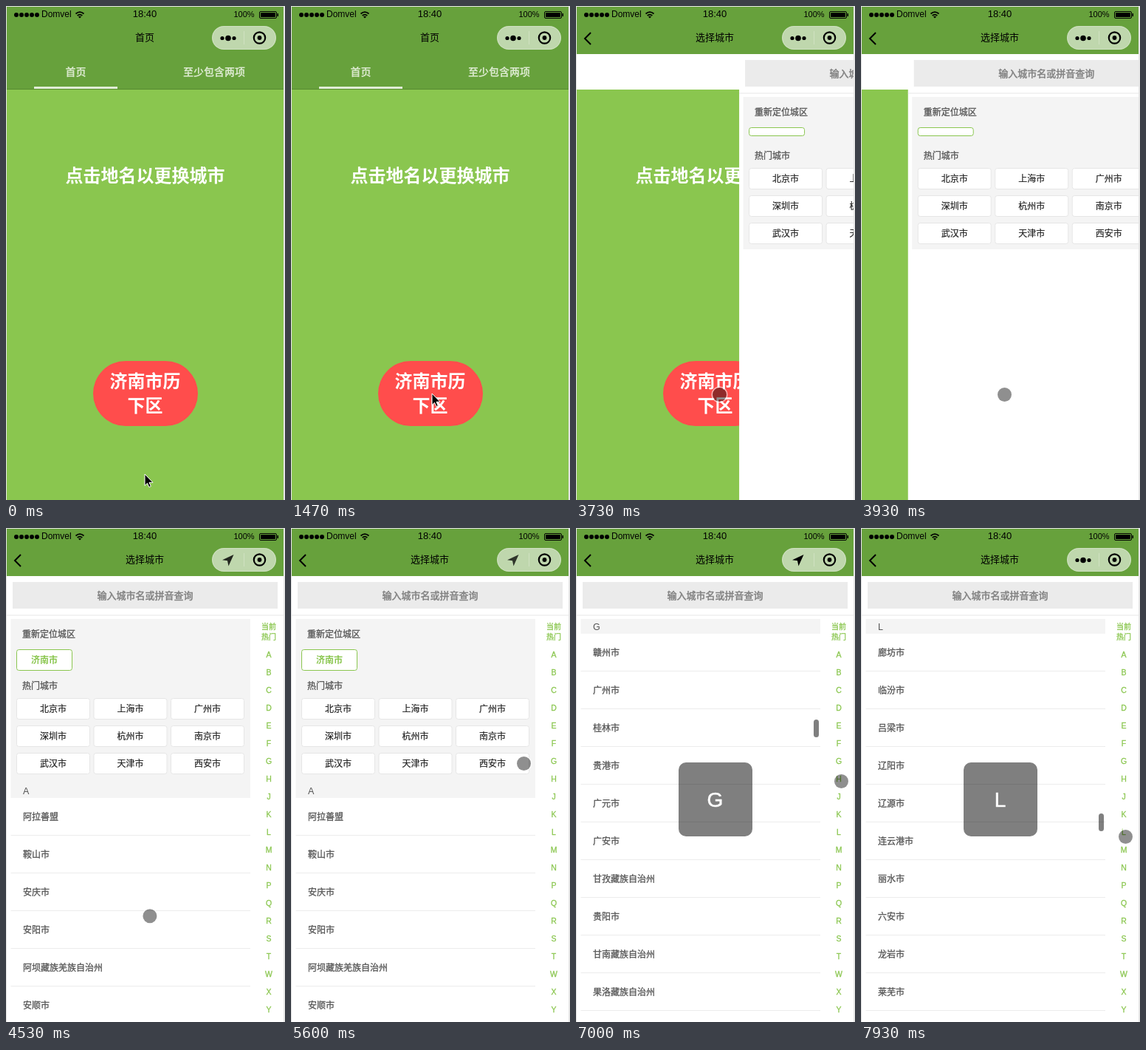
Animation, 378 px wide and 668 px high, one loop 8000 ms. Source, as an HTML page:

```html
<!DOCTYPE html>
<html lang="zh">
<head>
<meta charset="utf-8">
<title>选择城市</title>
<style>
html, body { margin: 0; width: 100%; height: 100%; overflow: hidden; background: #e6e6e6; }
svg { display: block; }
text { font-family: "Liberation Sans", "Noto Sans CJK SC", "Noto Sans CJK", sans-serif; }
</style>
</head>
<body>
<svg id="stage" width="378" height="668"></svg>
<script>
const LOOP = 8000, GREEN = '#8ac64f', BAR = '#67a13c', INK = '#555';

function el(parent, tag, attrs = {}) {
  const node = document.createElementNS('http://www.w3.org/2000/svg', tag);
  for (const key in attrs) node.setAttribute(key, attrs[key]);
  return parent.appendChild(node);
}
const group = (parent, attrs) => el(parent, 'g', attrs);
const rect = (parent, x, y, width, height, fill, attrs) =>
  el(parent, 'rect', { x, y, width, height, fill, ...attrs });
const dot = (parent, cx, cy, r, attrs) => el(parent, 'circle', { cx, cy, r, ...attrs });
const path = (parent, d, attrs) => el(parent, 'path', { d, ...attrs });
// Text is placed by its vertical middle; a thin stroke gives the medium weight.
function label(parent, words, x, middle, size, fill, attrs) {
  const node = el(parent, 'text', { x, y: middle + size * .37, 'font-size': size, fill, ...attrs });
  node.textContent = words;
  return node;
}
const medium = (color, width = .3) => ({ stroke: color, 'stroke-width': width });
const centred = (parent, words, x, middle, size, fill, attrs) =>
  label(parent, words, x, middle, size, fill, { 'text-anchor': 'middle', ...attrs });
const BOLD = { 'font-weight': 700 };
const show = (node, on) => node.setAttribute('visibility', on ? 'inherit' : 'hidden');
const move = (node, x, y) => node.setAttribute('transform', `translate(${x} ${y})`);

const stage = document.getElementById('stage');
const screen = el(stage, 'svg', { width: 376, height: 668 });
rect(screen, 1, 1, 375, 667, '#fff');

// Home page
const home = group(screen);
rect(home, 1, 113, 375, 555, GREEN);
centred(home, '点击地名以更换城市', 188.5, 229.5, 24, '#fff', BOLD);
rect(home, 118, 480, 142, 88, '#ff4d4c', { rx: 44 });
centred(home, '济南市历', 188.5, 507.5, 24, '#fff', BOLD);
centred(home, '下区', 188.5, 540.5, 24, '#fff', BOLD);

const tabs = group(screen);
rect(tabs, 1, 65, 375, 48, BAR);
rect(tabs, 1, 112, 375, 1, '#568a31');
centred(tabs, '首页', 94.5, 88.5, 14, '#d9e8cc', BOLD);
centred(tabs, '至少包含两项', 282, 88.5, 14, '#d9e8cc', BOLD);
rect(tabs, 38, 109, 113, 3, '#e1edd7');

// City page
const page = group(screen);
rect(page, 1, 65, 375, 603, '#fff');
rect(page, 9, 73, 359, 36, '#ebebeb');
centred(page, '输入城市名或拼音查询', 188.5, 91, 13, '#808080', medium('#808080', .5));
rect(page, 1, 117.5, 375, 1, '#e8e8e8');

const view = el(page, 'svg', { y: 123, width: 376, height: 545 });
const content = group(view);
const panel = rect(content, 6.5, 0, 324.5, 206, '#f4f4f4');
label(content, '重新定位城区', 22, 20.5, 12, INK, medium(INK));
const spot = rect(content, 14.5, 41.5, 75, 11, '#fff', { rx: 3, stroke: GREEN });
const spotName = centred(content, '济南市', 52, 55.5, 12, GREEN, BOLD);
const hot = group(content);
label(hot, '热门城市', 22, 90.5, 12, INK, medium(INK));
'北京市 上海市 广州市 深圳市 杭州市 南京市 武汉市 天津市 西安市'.split(' ').forEach((city, i) => {
  const x = 14.5 + i % 3 * 104.5, y = 107.5 + Math.floor(i / 3) * 37;
  rect(hot, x, y, 99, 28, '#fff', { rx: 3, stroke: '#e6e6e6' });
  centred(hot, city, x + 49.5, y + 14, 12, '#222', medium('#222', .2));
});

// Each section: letter, scroll thumb position, cities
const sections = [
  'A 130 阿拉善盟 鞍山市 安庆市 安阳市 阿坝藏族羌族自治州 安顺市 阿里地区 安康市 阿克苏地区 阿勒泰地区 澳门',
  'B 149 北京市 保定市 包头市 巴彦淖尔市 本溪市 白山市 白城市 蚌埠市 亳州市 滨州市 北海市',
  'C 175 承德市 沧州市 长治市 赤峰市 朝阳市 长春市 常州市 滁州市 巢湖市 池州市 长沙市',
  'D 210 大同市 大连市 丹东市 大庆市 大兴安岭地区 东营市 德州市 东莞市 德阳市 达州市 大理白族自治州',
  'E 236 鄂尔多斯市 鄂州市 恩施土家族苗族自治州',
  'F 241 抚顺市 阜新市 阜阳市 福州市 抚州市 佛山市 防城港市',
  'G 259 赣州市 广州市 桂林市 贵港市 广元市 广安市 甘孜藏族自治州 贵阳市 甘南藏族自治州 果洛藏族自治州 固原市',
  'H 281 邯郸市 衡水市 呼和浩特市 呼伦贝尔市 葫芦岛市 哈尔滨市 鹤岗市 黑河市 淮安市 杭州市 湖州市',
  'J 332 晋城市 晋中市 锦州市 吉林市 鸡西市 佳木斯市 嘉兴市 金华市 景德镇市 九江市 吉安市',
  'K 373 开封市 昆明市 克拉玛依市 克孜勒苏柯尔克孜自治州 喀什地区',
  'L 386 廊坊市 临汾市 吕梁市 辽阳市 辽源市 连云港市 丽水市 六安市 龙岩市 莱芜市 临沂市',
].map(line => {
  const [letter, thumb, ...cities] = line.split(' ');
  return { letter, thumb: +thumb, cities };
});
const list = group(content);
let rowTop = 222;
for (const section of sections) {
  section.top = rowTop;
  rect(list, 6.5, rowTop, 324.5, 20, '#f4f4f4');
  label(list, section.letter, 23, rowTop + 10.5, 12.5, INK);
  rowTop += 20;
  for (const city of section.cities) {
    label(list, city, 23, rowTop + 25.5, 12, INK, medium(INK));
    rect(list, 6.5, rowTop + 50, 324.5, 1, '#ececec');
    rowTop += 51;
  }
}

centred(page, '当前', 356, 133, 10, GREEN, medium(GREEN));
centred(page, '热门', 356, 147, 10, GREEN, medium(GREEN));
[...'ABCDEFGHJKLMNPQRSTWXY'].forEach((letter, i) =>
  centred(page, letter, 356, 171 + i * 24, 10.5, GREEN, medium(GREEN)));

const overlay = group(page);
const thumb = rect(overlay, 322, 0, 7, 24, '#000', { rx: 3.5, opacity: .5 });
rect(overlay, 139, 317, 100, 100, '#000', { rx: 10, opacity: .5 });
const toast = centred(overlay, '', 188.5, 367, 28, '#fff', medium('#fff', .5));

// Status and title bar
const bar = group(screen);
rect(bar, 1, 1, 375, 64, BAR);
for (let i = 0; i < 5; i++) dot(bar, 14 + i * 7, 12, 3);
label(bar, 'Domvel', 48, 10.5, 12, '#000');
path(bar, 'M94.5 10.5Q100 5.8 105.5 10.5M96.7 13Q100 10.2 103.3 13',
  { fill: 'none', stroke: '#000', 'stroke-width': 1.7 });
path(bar, 'M98 14.4Q100 12.9 102 14.4L100 16.6Z');
centred(bar, '18:40', 188, 10.4, 13, '#000');
label(bar, '100%', 308.5, 11, 11, '#000');
rect(bar, 343.5, 7.5, 23, 9, 'none', { rx: 1.5, stroke: '#000' });
rect(bar, 345, 9, 20, 6, '#000');
rect(bar, 367.5, 10, 1.5, 4, '#000');

const title = centred(bar, '', 188, 42, 13, '#000');
const back = path(bar, 'M20 36L12 44L20 52', { fill: 'none', stroke: '#000', 'stroke-width': 2 });
rect(bar, 279, 27, 87, 32, '#fff', { rx: 16, opacity: .58 });
rect(bar, 279.5, 27.5, 86, 31, 'none', { rx: 15.5, stroke: '#fff', opacity: .25 });
rect(bar, 322, 34, 1, 18, '#fff', { opacity: .25 });
const more = group(bar);
dot(more, 293, 43.5, 2.6);
dot(more, 301, 43.5, 3.8);
dot(more, 309, 43.5, 2.6);
const locating = path(bar, 'M308.5 36L293 43.3L300 44.3L301.5 51.5Z');
dot(bar, 343.5, 43, 7.7, { fill: 'none', stroke: '#000', 'stroke-width': 2.2 });
dot(bar, 343.5, 43, 2.9);

// Pointer: an arrow that turns into a touch spot
const pointer = group(stage);
const arrow = path(pointer, 'M-4 -7V8.5L-.5 5.3L1.8 10.6L4.3 9.5L2 4.3H7Z',
  { fill: '#000', stroke: '#fff', 'stroke-width': 1 });
const touch = group(pointer);
dot(touch, 0, 0, 10.2, { fill: 'none', stroke: '#fff', 'stroke-width': 1.6, opacity: .6 });
dot(touch, 0, 0, 9.5, { opacity: .44 });

// time, x, y
const track = [
  [0, 192, 640], [150, 192, 640], [900, 195, 533], [1470, 195, 531], [1800, 195, 531],
  [2150, 196, 582], [2600, 195, 537], [2930, 195, 535], [3400, 194.5, 525.5], [4500, 194.5, 525.5],
  [5400, 315.5, 318.5], [5640, 315.5, 318.5], [5960, 357, 171], [6080, 358, 171],
  [7000, 359.5, 342.5], [7750, 358.5, 396], [7840, 358.5, 417.5], [LOOP, 358.5, 417.5],
];
const clamp = v => Math.max(0, Math.min(1, v));
const ramp = (t, from, to) => clamp((t - from) / (to - from));

function pointerAt(t) {
  const i = Math.max(1, track.findIndex(key => key[0] > t));
  const [t0, x0, y0] = track[i - 1], [t1, x1, y1] = track[i];
  const p = ramp(t, t0, t1), e = t0 < 6000 ? p * p * (3 - 2 * p) : p;
  return [x0 + (x1 - x0) * e, y0 + (y1 - y0) * e];
}

const NAVIGATE = 3470, SLIDE = 3600, LOCATED = 4500, PRESS = 5980, LAG = 90;

function draw(t) {
  const inCity = t >= NAVIGATE, located = t >= LOCATED, pressed = t >= PRESS;
  title.textContent = inCity ? '选择城市' : '首页';
  show(back, inCity);
  show(tabs, !inCity);
  show(page, t >= SLIDE);
  move(page, 375 * (1 - ramp(t, SLIDE, SLIDE + 560)) ** 2, 0);

  const searching = t >= 4350 && t < 7250;
  show(more, !searching);
  show(locating, searching);
  locating.setAttribute('opacity', .75 + .25 * Math.cos((t - 7000) / 1120 * 2 * Math.PI));

  panel.setAttribute('height', located ? 222 : 206);
  spot.setAttribute('height', located ? 28 : 11);
  show(spotName, located);
  show(list, located);
  move(hot, 0, located ? 0 : -11);

  // The list follows the touched letter a little late.
  const touchedY = pointerAt(t - LAG)[1];
  const index = Math.max(0, Math.min(sections.length - 1, Math.round((touchedY - 171) / 24)));
  const section = sections[index];
  move(content, 0, pressed ? -section.top : 0);
  show(overlay, pressed);
  thumb.setAttribute('y', section.thumb);
  toast.textContent = section.letter;

  move(pointer, ...pointerAt(t));
  arrow.setAttribute('opacity', 1 - ramp(t, 2800, 2990));
  touch.setAttribute('opacity', ramp(t, 2800, 2930));
}

const start = performance.now();
function frame() {
  draw((performance.now() - start) % LOOP);
  requestAnimationFrame(frame);
}
frame();
</script>
</body>
</html>
```
